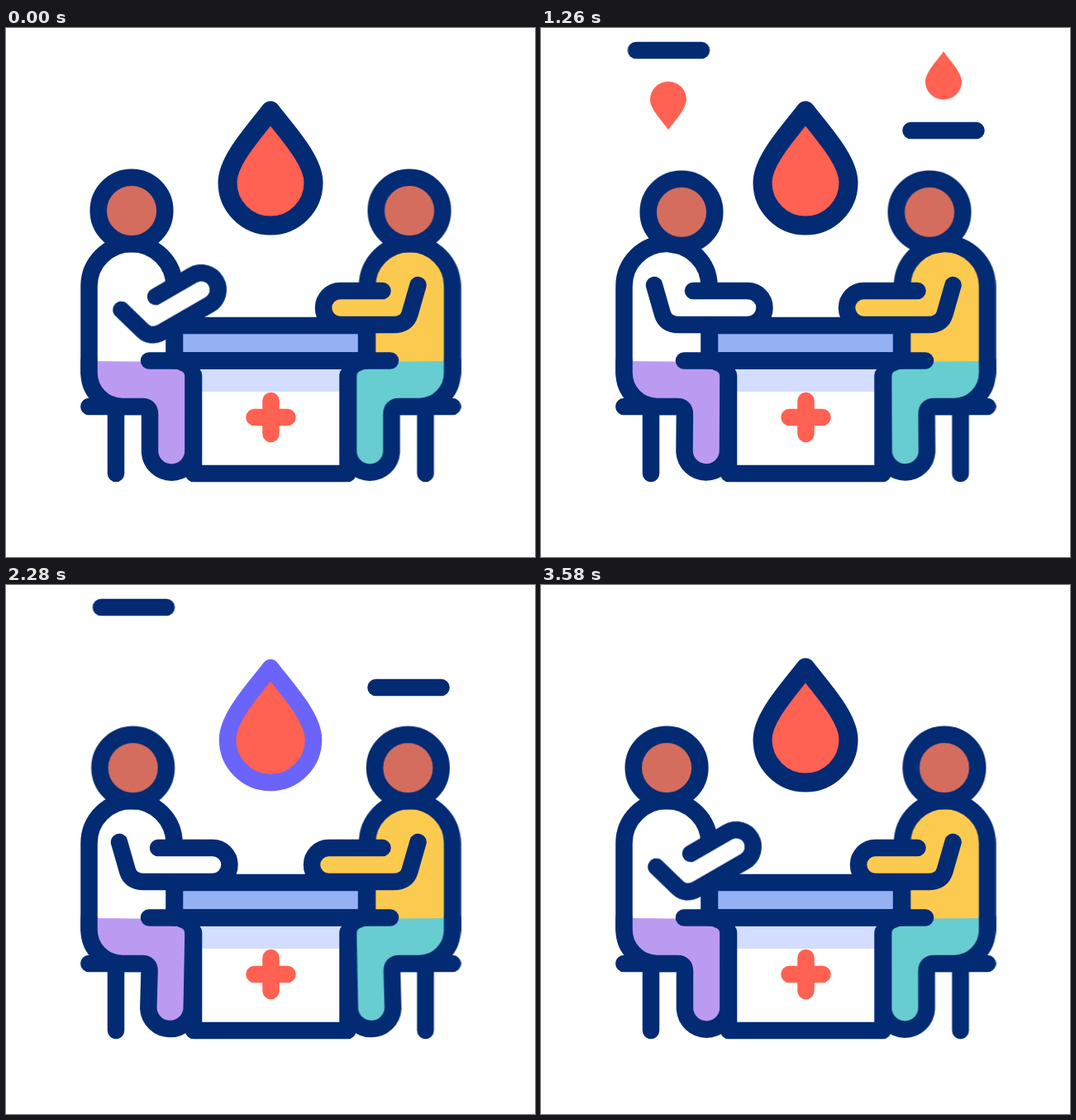
Write an HTML page without scripts that moves like this. It is 640 px wide and 640 px high and loops after 3600 ms.

```html
<!DOCTYPE html>
<html lang="en">
<head>
<meta charset="utf-8">
<title>Blood donation</title>
<style>
  html, body { margin: 0; width: 100%; height: 100%; overflow: hidden; background: #fff; }
  svg { display: block; width: 100vw; height: 100vh; }

  .line { stroke: #032b74; stroke-width: 20.5; stroke-linecap: round; stroke-linejoin: round; fill: none; }
  .shirt { fill: var(--shirt); }
  .pants { fill: var(--pants); }
  .skin { fill: #d46d5e; }
  .red { fill: #ff6152; }
  .left { --shirt: #fff; --pants: #bb9af2; }
  .right { --shirt: #fdca50; --pants: #67cdd1; }

  .drip { d: path("M0 0C-6 9-22 25-22 36.5A22 22 0 0 0 22 36.5C22 25 6 9 0 0Z"); }
  .body { d: path("M100.5 417V312.5A51.5 51.5 0 0 1 203.5 312.5V403"); }
  .stool { d: path("M100.3 458H162M133 458V539"); }
  .bigDrop { d: path("M320 100C300 126 268 160 268 187A52 52 0 0 0 372 187C372 160 340 126 320 100Z"); }

  .head, .pants, .raise, .reach, .slide, .dash, .drip, .ring {
    animation: 3.6s cubic-bezier(.37, 0, .63, 1) infinite both;
  }
  .head { animation-name: nod; }
  .pants { animation-name: swing; animation-duration: 1.2s; }
  .raise { animation-name: raise; transform-origin: 194px 321.5px; }
  .reach { animation-name: reach; }
  .slide { animation-name: slide; }
  .dash { animation-name: dash; }
  .drip { animation-name: drip; animation-timing-function: linear; }
  .drip.late { animation-name: dripLate; }
  .ring { animation-name: ring; stroke-width: 23; stroke-dasharray: 1 2; }

  @keyframes nod {
    0%, 66.667%, 100% { transform: none; }
    33.333%, 50%, 83.333% { transform: translate(18px, 1.8px); }
  }
  @keyframes swing {
    0%, 100% { d: path("M100.5 403V417A40 41 0 0 0 140.5 458H165Q174 458 174 467L174 513A26.3 26.3 0 0 0 226.5 513L226.5 422Q226.5 408 212 404"); }
    50% { d: path("M100.5 403V417A40 41 0 0 0 140.5 458H162Q171 458 169 467L155.5 508A26.3 26.3 0 0 0 207 518L226.5 424Q228 408 212 404"); }
  }
  @keyframes raise {
    0%, 94.444%, 100% { transform: rotate(-30deg); }
    11.111%, 81.667% { transform: none; }
  }
  @keyframes reach {
    0%, 11.111%, 81.667%, 100% { d: path("M181 318H233A20.5 20.5 0 0 1 233 359H167Q151 359 147 346L137 311"); }
    19.444%, 73.333% { d: path("M184 318H250A20.5 20.5 0 0 1 250 359H167Q151 359 147 346L137 311"); }
  }
  @keyframes slide {
    0%, 5.556%, 94.444%, 100% { d: path("M185 318H236A20.5 20.5 0 0 1 236 359H172Q156 359 152 346L142 311"); }
    16.667%, 83.333% { d: path("M185 318H250A20.5 20.5 0 0 1 250 359H172Q156 359 152 346L142 311"); }
  }
  @keyframes dash {
    0%, 2.77%, 80.56%, 100% { d: path("M0 0H0"); opacity: 0; }
    2.78%, 80.55% { d: path("M0 0H0"); opacity: 1; }
    19.444%, 63.889% { d: path("M-39.5 0H39.5"); opacity: 1; }
  }
  @keyframes drip {
    0%, 16.667% { transform: translateY(-136px); }
    52.778%, 100% { transform: translateY(132px); }
  }
  @keyframes dripLate {
    0%, 32.417% { transform: translateY(-136px); }
    68.528%, 100% { transform: translateY(132px); }
  }
  @keyframes ring {
    0%, 52.778%, 97.222%, 100% { stroke-dashoffset: 0; }
    63.056%, 80.556% { stroke-dashoffset: 1.05; }
  }
</style>
</head>
<body>
<svg viewBox="0 0 640 640">
  <clipPath id="belowDash"><path d="M0 27H320V300H0Z"/></clipPath>
  <clipPath id="aboveDash"><path d="M320 0H640V124H320Z"/></clipPath>

  <g clip-path="url(#belowDash)">
    <g transform="translate(154 123.5) scale(1 -1)">
      <path class="red drip"/>
      <path class="red drip late"/>
    </g>
  </g>
  <g clip-path="url(#aboveDash)">
    <g transform="translate(487 28)">
      <path class="red drip"/>
      <path class="red drip late"/>
    </g>
  </g>
  <g transform="translate(154.5 27)"><path class="line dash"/></g>
  <g transform="translate(487 124)"><path class="line dash"/></g>

  <g class="left">
    <path class="line stool"/>
    <path class="line shirt body"/>
    <path class="line pants"/>
    <circle class="line skin head" cx="152" cy="221" r="40.3"/>
    <g class="raise"><path class="line shirt reach"/></g>
  </g>
  <g class="right" transform="translate(640.5 0) scale(-1 1)">
    <path class="line stool"/>
    <path class="line shirt body"/>
    <path class="line pants"/>
    <circle class="line skin head" cx="152.5" cy="221" r="40.3"/>
    <path class="line shirt slide"/>
  </g>

  <!-- table -->
  <path d="M237 408H404V535H237Z" fill="#fff"/>
  <path d="M235 408H406V440H235Z" fill="#d2ddff"/>
  <path class="line" d="M227 420V539H413.5V420"/>
  <path class="line" d="M204 360H436V402.5H204Z" style="fill:#94b1f4"/>
  <path class="line" d="M173 402.5H465"/>
  <path d="M300.5 471H340.5M320.5 451V491" stroke="#ff6152" stroke-width="20.5" stroke-linecap="round"/>

  <path class="red bigDrop" stroke="#6b64fa" stroke-width="20.5" stroke-linejoin="round"/>
  <path class="line bigDrop ring" pathLength="1"/>
</svg>
</body>
</html>
```
